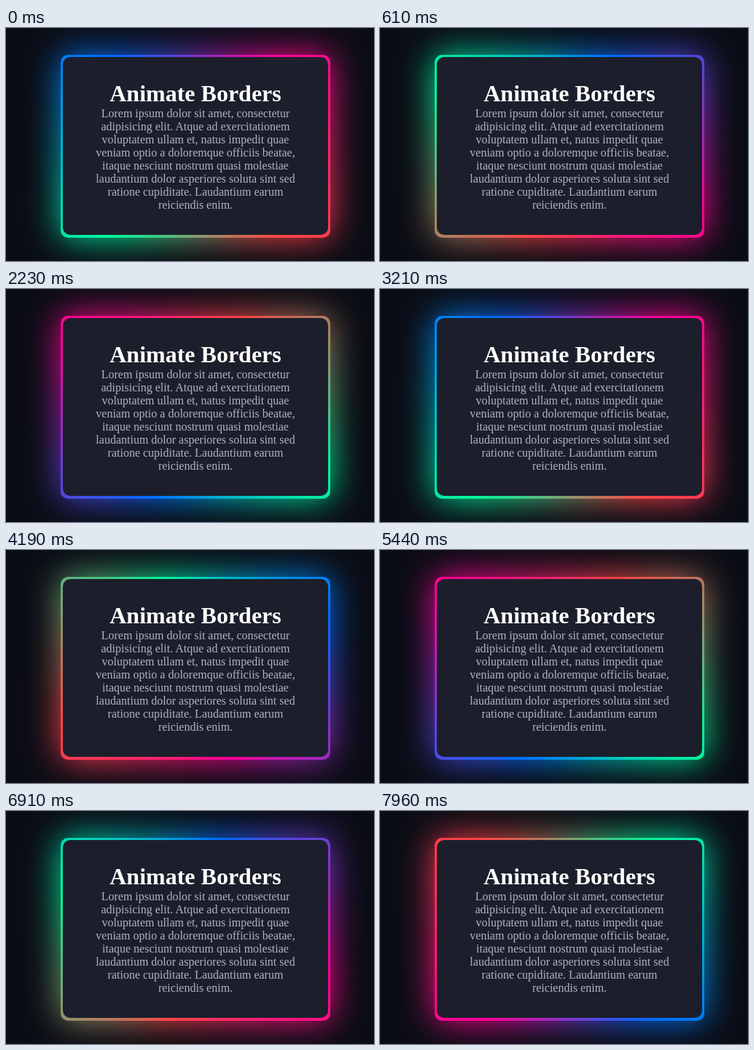
Write an HTML page that moves like this. It is 505x321 px and loops after 8000 ms.

```html
<!DOCTYPE html>
<html lang="en">
<head>
<meta charset="utf-8">
<title>Animate Borders</title>
<style>
  html, body {
    margin: 0;
    width: 100%;
    height: 100%;
    overflow: hidden;
    background: #0b0d15;
  }
  .frame {
    position: absolute;
    left: 75px;
    top: 37px;
    width: 370px;
    height: 252px;
  }
  .frame::before, .frame::after {
    content: "";
    position: absolute;
    inset: 0;
    border-radius: 10px;
    background: conic-gradient(from var(--angle, 135deg), #ff4545, #00f59b, #006aff, #ff0095, #ff4545);
  }
  .frame::before {
    filter: blur(24px);
  }
  .card {
    position: absolute;
    z-index: 1;
    inset: 3px 3px 4px;
    box-sizing: border-box;
    padding: 32px 0;
    border-radius: 10px;
    background: #1c1f2b;
    color: #fff;
    font-family: "Liberation Serif", "Times New Roman", serif;
    text-align: center;
    white-space: nowrap;
  }
  h1 {
    margin: 0 0 1px;
    font-size: 32px;
    line-height: 36px;
  }
  p {
    margin: 0;
    font-size: 16px;
    line-height: 18px;
    color: #b0b2c1;
  }
</style>
</head>
<body>
<div class="frame">
  <div class="card">
    <h1>Animate Borders</h1>
    <p>Lorem ipsum dolor sit amet, consectetur<br>
      adipisicing elit. Atque ad exercitationem<br>
      voluptatem ullam et, natus impedit quae<br>
      veniam optio a doloremque officiis beatae,<br>
      itaque nesciunt nostrum quasi molestiae<br>
      laudantium dolor asperiores soluta sint sed<br>
      ratione cupiditate. Laudantium earum<br>
      reiciendis enim.</p>
  </div>
</div>
<script>
  const LOOP = 8000;
  const STEP_MS = 69.83;
  const STEP_DEG = 7.9;
  const START_DEG = 135;
  const LEAD_MS = 20;
  const frame = document.querySelector(".frame");
  const startTime = performance.now();

  // The border turns in short, even steps.
  function draw(now) {
    const time = Math.max(0, now - startTime) % LOOP;
    const step = Math.floor((time + LEAD_MS) / STEP_MS);
    frame.style.setProperty("--angle", `${START_DEG + step * STEP_DEG}deg`);
    requestAnimationFrame(draw);
  }
  draw(startTime);
</script>
</body>
</html>
```
